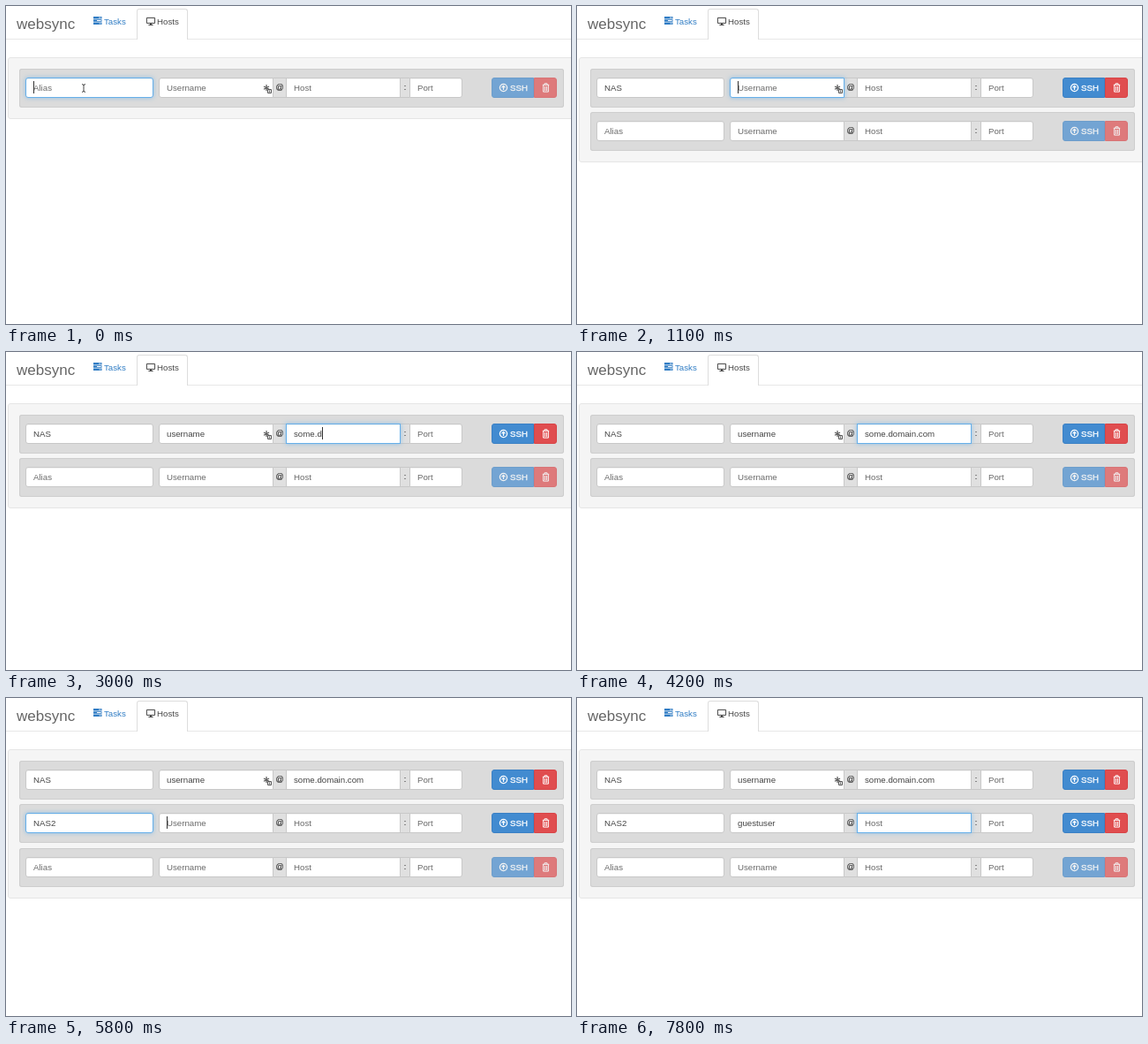
Recreate the animation shown at these times as an HTML page. Size 640 by 360 pixels, loop 8 s.

```html
<!DOCTYPE html>
<html lang="en">
<head>
<meta charset="utf-8">
<title>websync hosts</title>
<style>
html, body { margin: 0; width: 100%; height: 100%; overflow: hidden; background: #fff; }
#stage { position: relative; width: 640px; height: 360px; overflow: hidden;
  font: 9.7px/21px "Liberation Sans", Arial, sans-serif; color: #444; white-space: nowrap; }
#stage div, #stage svg { position: absolute; box-sizing: border-box; }
#rows { left: 0; top: 0; }
.brand { left: 12px; top: 10px; font-size: 17px; color: #666; }
.line { left: 0; top: 37px; width: 640px; height: 1px; background: #e8e8e8; }
.tab { left: 148px; top: 3px; width: 58px; height: 35px; background: #fff;
  border: 1px solid #ddd; border-bottom: 0; border-radius: 3px 3px 0 0; }
.link { left: 111px; top: 7px; color: #2f7cc4; }
.here { left: 171px; top: 7px; color: #484848; }
#well { left: 2px; top: 58px; width: 650px; background: #f5f5f5;
  border: 1px solid #e5e5e5; border-radius: 3px; }
.row { left: 15px; width: 617px; height: 44px; background: #dbdbdb;
  border-radius: 3px; box-shadow: inset 0 0 0 1px #cecece; }
.input { top: 10px; height: 23px; padding-left: 8px; background: #fff; border-radius: 3px;
  border: 1px solid color-mix(in srgb, #66afe9 calc(var(--glow, 0) * 100%), #c8c8c8);
  box-shadow: inset 0 1px 1px rgba(0,0,0,.06), 0 0 5px rgba(102,175,233, calc(var(--glow, 0) * .65)); }
.input.u { border-radius: 3px 0 0 3px; }
.input.h { border-radius: 0; }
.input.p { border-radius: 0 3px 3px 0; }
.input i { position: absolute; top: 3px; width: 1px; height: 14px; background: #333; }
.input em { font-style: normal; color: #6a6a6a; }
.addon { top: 10px; height: 23px; background: #e0e0e0; text-align: center; font-size: 9px;
  -webkit-text-stroke: .2px #444; border: solid #c8c8c8; border-width: 1px 0; }
.btn { top: 10px; height: 23px; color: #fff; border: 1px solid; }
.btn.s { left: 535px; width: 48px; padding-left: 20px; background: #428bd0;
  border-color: #3a80c4; border-radius: 3px 0 0 3px; -webkit-text-stroke: .3px #fff; }
.btn.t { left: 583px; width: 26px; background: #e04d4f; border-color: #d84447; border-radius: 0 3px 3px 0; }
.btn.s.focus { background: #3276b1; border-color: #285e8e; }
.btn.t.focus { background: #c9383b; border-color: #ac2925; }
.off .btn { opacity: .68; }
</style>
</head>
<body>
<div id="stage">
  <div class="brand">websync</div>
  <div class="line"></div>
  <div class="tab"></div>
  <svg style="left:99px;top:12px" width="10" height="10" fill="#2f7cc4">
    <path d="M0 0h9.5v2.4H0zM0 3.3h9.5v2.4H0zM0 6.6h9.5V9H0z"/>
    <path d="M6 .8h2.6v.8H6zM4 4.1h4.6v.8H4zM6.6 7.4h2v.8h-2z" fill="#fff"/>
  </svg>
  <div class="link">Tasks</div>
  <svg style="left:158px;top:12px" width="12" height="11" fill="#444">
    <path d="M1.4 1.4h9.2v6H1.4z" fill="none" stroke="#444"/>
    <path d="M5 7.5h2v1.5h1.6v1H3.4V9H5z"/>
  </svg>
  <div class="here">Hosts</div>
  <div id="well"></div>
  <div id="rows"></div>
  <svg style="left:291px;top:88px" width="11" height="12" stroke="#555" fill="none">
    <path d="M4 1v7M1 3l6 3.2M1 6.2l6-3.2" stroke-width="1.2"/>
    <path d="M5.5 6.5h4v4h-4z" fill="#eee"/><path d="M7.5 7.5v2"/>
  </svg>
  <svg id="mouse" style="left:85px;top:88px" width="6" height="10" fill="none" stroke="#333" stroke-width=".9">
    <path d="M1 .6Q3 .6 3 2V8Q3 9.4 1 9.4M5 .6Q3 .6 3 2M3 8Q3 9.4 5 9.4"/>
  </svg>
</div>
<script>
const LOOP = 8000, STEP = 100, FADE = 150, CARET_ON = 400, CARET_CYCLE = 1000;
const PITCH = 49.4;

// key, left, width, placeholder
const INPUTS = [
  ['a', 7, 145, 'Alias'], ['u', 158, 130, 'Username'],
  ['h', 302, 130, 'Host'], ['p', 442, 60, 'Port']
];

// field, text, time of each keystroke
const TYPING = [
  ['a0', 'NAS', [400, 600, 800]],
  ['u0', 'username', [1400, 1600, 1600, 1700, 1700, 1800, 1800, 1900]],
  ['h0', 'some.domain.com', [2400, 2500, 2600, 2700, 2800, 3000,
    3200, 3300, 3400, 3500, 3600, 3800, 3800, 3900, 4000]],
  ['a1', 'NAS2', [5300, 5400, 5600, 5700]],
  ['u1', 'guestuser', [6400, 6500, 6600, 6700, 6900, 7100, 7200, 7300, 7400]]
];

const FOCUS = [
  [-1000, 'a0'], [900, 'u0'], [2000, 'h0'], [4200, 'p0'], [4400, 's0'],
  [4500, 't0'], [4800, 'a1'], [5800, 'u1'], [7400, 'h1']
];

const ROW_TIMES = [0, 400, 5300];

const inputHtml = ([key, x, w, hint]) =>
  `<div class="input ${key}" data-hint="${hint}" style="left:${x}px;width:${w}px"><span></span><i></i><em>${hint}</em></div>`;

const rowHtml = n => `<div class="row" style="top:${Math.round(71 + n * PITCH)}px">
  <div class="addon" style="left:287px;width:16px">@</div>
  <div class="addon" style="left:431px;width:12px">:</div>
  ${INPUTS.map(inputHtml).join('')}
  <div class="btn s">SSH<svg style="left:7px;top:5px" width="11" height="11" fill="none" stroke="#fff" stroke-width="1.3">
    <circle cx="5.5" cy="5.5" r="4.1"/><path d="M5.5 8V3.4M3.5 5.4l2-2 2 2"/></svg></div>
  <div class="btn t"><svg style="left:8px;top:5px" width="10" height="11" fill="none" stroke="#fff">
    <path d="M.8 2.3h7.4M3 2V.8h3V2M1.6 2.5v7.6h5.8V2.5M3.5 4v5M5.5 4v5"/></svg></div>
</div>`;

const $ = id => document.getElementById(id);
$('rows').innerHTML = ROW_TIMES.map((_, n) => rowHtml(n)).join('');
const rows = [...document.querySelectorAll('.row')];

const fields = {};
rows.forEach((row, n) => [...'auhpst'].forEach(k => {
  fields[k + n] = row.querySelector('.input.' + k + ', .btn.' + k);
}));

const ease = p => {
  p = Math.min(1, Math.max(0, p));
  return p * p * (3 - 2 * p);
};

function draw(now) {
  const t = Math.floor(now % LOOP / STEP) * STEP;
  const typed = {};
  let lastKey = 0;
  for (const [id, text, times] of TYPING) {
    const hits = times.filter(k => k <= t);
    typed[id] = text.slice(0, hits.length);
    if (hits.length) lastKey = hits[hits.length - 1];
  }

  const at = FOCUS.findLastIndex(([time]) => time <= t);
  const [since, active] = FOCUS[at];
  const previous = at ? FOCUS[at - 1][1] : '';
  const fade = ease((t - since) / FADE);
  const idle = t - Math.max(since, lastKey);
  const caret = active !== 'p0' && idle % CARET_CYCLE < CARET_ON;

  for (const id in fields) {
    const el = fields[id];
    if (el.classList.contains('btn')) {
      el.classList.toggle('focus', id === active);
      continue;
    }
    const text = typed[id] || '';
    const [value, bar, hint] = el.children;
    value.textContent = text;
    hint.textContent = text ? '' : el.dataset.hint;
    bar.style.display = id === active && caret ? '' : 'none';
    el.style.setProperty('--glow', id === active ? fade : id === previous ? 1 - fade : 0);
  }

  let count = 0;
  rows.forEach((row, n) => {
    const shown = t >= ROW_TIMES[n];
    count += shown;
    row.style.display = shown ? '' : 'none';
    row.classList.toggle('off', !typed['a' + n]);
  });
  $('well').style.height = Math.round(20.6 + count * PITCH) + 'px';
  $('mouse').style.display = t < TYPING[0][2][0] ? '' : 'none';
}

const start = performance.now();
function tick() {
  draw(performance.now() - start);
  requestAnimationFrame(tick);
}
tick();
</script>
</body>
</html>
```
